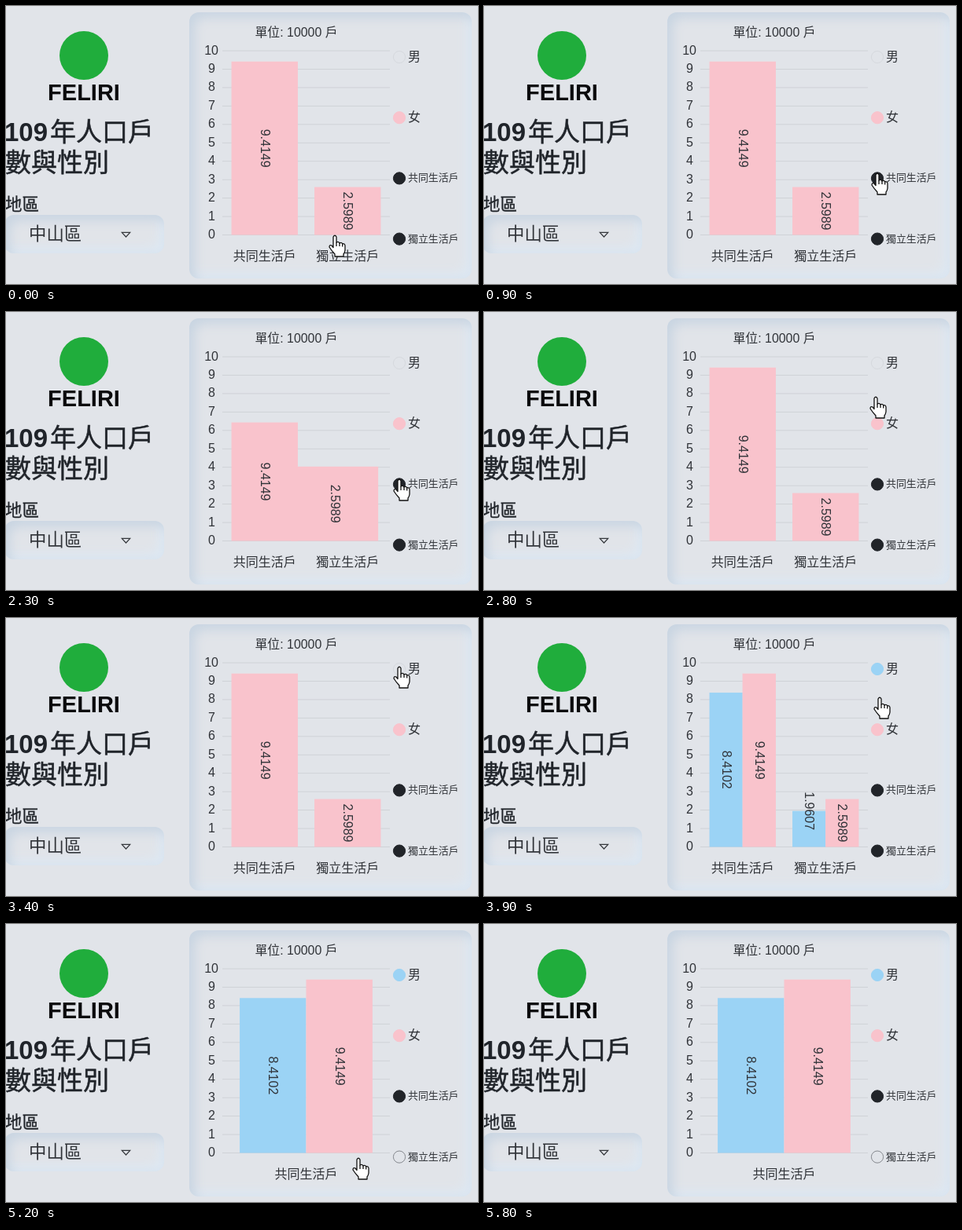
An HTML page that plays this animation: 600 px wide and 354 px high, repeating every 6300 ms.

```html
<!DOCTYPE html>
<html lang="zh-Hant">
<head>
<meta charset="utf-8">
<title>人口戶數與性別</title>
<style>
  html, body { margin: 0; width: 100%; height: 100%; overflow: hidden; }
  body { background: #e1e4e9; }
  #stage { position: relative; width: 600px; height: 354px; overflow: hidden; background: #e1e4e9; }
  .well {
    position: absolute; border-radius: 12px;
    box-shadow: inset 7px 7px 14px #c9d5e2, inset -7px -7px 14px #dde8f3;
  }
  #panel { left: 233px; top: 8px; width: 359px; height: 339px; }
  #select { left: -2px; top: 266px; width: 203px; height: 49px; }
  svg { position: absolute; left: 0; top: 0; }
  text {
    font-family: 'Liberation Sans', 'Noto Sans CJK TC', 'Noto Sans CJK', 'Noto Sans CJK JP', sans-serif;
    font-size: 16px; fill: #303338;
  }
  .head { font-size: 33px; font-weight: 500; fill: #20242a; }
  .cjk { stroke: #20242a; stroke-width: 0.5; }
  .mid { text-anchor: middle; }
  .end { text-anchor: end; }
  .small { font-size: 12.9px; }
</style>
</head>
<body>
<div id="stage">
  <div class="well" id="panel"></div>
  <div class="well" id="select"></div>
  <svg width="600" height="354" viewBox="0 0 600 354">
    <circle cx="99" cy="63" r="31" fill="#20ad3c"/>
    <text class="mid" x="99" y="120" style="font-size:29px;font-weight:bold;fill:#0b0b0d">FELIRI</text>
    <text class="head" x="-2" y="172"><tspan font-weight="bold">109</tspan><tspan class="cjk" dx="3">年人口戶</tspan></text>
    <text class="head cjk" x="-1" y="211">數與性別</text>
    <text class="cjk" x="-1" y="260" style="font-size:21.5px;fill:#20242a;stroke-width:.3">地區</text>
    <text x="29" y="298" style="font-size:22.4px">中山區</text>
    <path d="M147.3 288.3H157.7L152.5 294Z" fill="none" stroke="#33363b" stroke-width="1.2"/>
    <text class="mid" x="369" y="38.5" style="font-size:15.9px">單位: 10000 戶</text>
    <g id="chart"></g>
    <g id="hand" stroke="#111" stroke-width="1.3" stroke-linejoin="round">
      <path fill="#fff" d="M-2 2Q0 -1.5 2 2V9Q4.5 7.5 6 9.8Q8.5 8.5 9.7 10.8Q12.5 10 13 13V19Q12.6 22 11 24V27H0V24Q-4.5 19 -7 15Q-6.8 11.5 -4 13L-2 15.5Z"/>
      <path fill="none" d="M2 9V14M6 10V14M9.7 11V14.5"/>
    </g>
  </svg>
</div>
<script>
const LOOP = 6300, STEP = 100, GROW = 400;
const LEFT = 276, WIDTH = 211, BASE = 291.5;
const series = [
  { name: '男', color: '#9bd3f5', off: '#d6d9de', values: [8.4102, 1.9607] },
  { name: '女', color: '#f9c3cc', off: '#d6d9de', values: [9.4149, 2.5989] }
];
const groups = ['共同生活戶', '獨立生活戶'];

// start time, visible series, visible groups
const states = [
  { at: -GROW, s: [1], g: [0, 1] },
  { at: 1000, s: [1], g: [1] },
  { at: 2200, s: [1], g: [0, 1] },
  { at: 3600, s: [0, 1], g: [0, 1] },
  { at: 4100, s: [0, 1], g: [0] }
];

// time, fingertip x, y
const path = [
  [0, 418, 292], [700, 500, 213], [1000, 500, 213], [1600, 434, 242],
  [2100, 500, 213], [2300, 500, 213], [2800, 498, 108], [3300, 500, 62],
  [3600, 500, 62], [3900, 503, 101], [4100, 502, 300], [4700, 502, 300],
  [5200, 448, 298], [5600, 440, 362], [LOOP, 440, 362]
];

const chart = document.getElementById('chart');
const hand = document.getElementById('hand');
const mix = (a, b, p) => a + (b - a) * p;
const last = (list, test) => list.reduce((found, item, i) => test(item) ? i : found, 0);
const text = (cls, x, y, str, extra = '') => `<text class="${cls}" x="${x}" y="${y}" ${extra}>${str}</text>`;

const scale = st => st.g.includes(0) ? { max: 10, unit: 23.45 } : { max: 3, unit: 64.5 };

function layout(st) {
  const bars = {}, slot = WIDTH / st.g.length, w = slot * 0.8 / st.s.length;
  st.g.forEach((g, i) => st.s.forEach((s, j) => {
    bars[s + '-' + g] = {
      x: LEFT + slot * (i + 0.1) + w * j, w,
      h: series[s].values[g] * scale(st).unit,
      color: series[s].color, label: series[s].values[g]
    };
  }));
  return bars;
}

function drawBar(bar, from, p) {
  const x = mix(from.x, bar.x, p), w = mix(from.w, bar.w, p), h = mix(from.h, bar.h, p);
  const cx = x + w / 2, cy = bar.h < 49 ? BASE - h : BASE - h / 2;
  return [
    `<rect x="${x}" y="${BASE - h}" width="${w}" height="${h}" fill="${bar.color}"/>`,
    text('mid', 0, 5, bar.label, `transform="translate(${cx} ${cy}) rotate(90)"`)
  ];
}

function legend(st) {
  const rows = [
    ...series.map((s, i) => ({ ...s, on: st.s.includes(i), cls: '', dy: 4.5 })),
    ...groups.map((name, i) => ({ name, color: '#212429', off: '#85888e', on: st.g.includes(i), cls: 'small', dy: 4 }))
  ];
  return rows.map((r, i) => {
    const y = 65 + 77.2 * i;
    return `<circle cx="500" cy="${y}" r="7.6" fill="${r.on ? r.color : 'none'}" stroke="${r.on ? r.color : r.off}"/>`
      + text(r.cls, 511, y + r.dy, r.name);
  }).join('');
}

function drawChart(t) {
  const k = last(states, s => s.at <= t), st = states[k];
  const p = 1 - (1 - Math.min(1, (t - st.at) / GROW)) ** 4;
  const bars = layout(st), prev = k ? layout(states[k - 1]) : bars;
  const { max, unit } = scale(st);
  let out = '';
  for (let v = 0; v <= max; v++) {
    const y = BASE - v * unit;
    out += `<path d="M275 ${y}H488" stroke="#cfd2d7"/>` + text('end', 266 + (v > 9 ? 4 : 0), y + 4.5, v);
  }
  const drawn = Object.keys(bars).map(id => drawBar(bars[id], prev[id] || { ...bars[id], h: 0 }, p));
  out += drawn.map(d => d[0]).join('') + drawn.map(d => d[1]).join('');
  const slot = WIDTH / st.g.length;
  st.g.forEach((g, i) => out += text('mid', LEFT + slot * (i + 0.5), 324, groups[g]));
  chart.innerHTML = out + legend(st);
}

function moveHand(t) {
  const i = Math.min(last(path, q => q[0] <= t), path.length - 2);
  const [t0, x0, y0] = path[i], [t1, x1, y1] = path[i + 1];
  const u = (t - t0) / (t1 - t0), p = u * u * (3 - 2 * u);
  hand.setAttribute('transform', `translate(${mix(x0, x1, p)} ${mix(y0, y1, p)})`);
}

let shown = -1;
function frame() {
  const t = Math.floor(performance.now() % LOOP / STEP) * STEP;
  if (t !== shown) {
    shown = t;
    drawChart(t);
    moveHand(t);
  }
  requestAnimationFrame(frame);
}
frame();
</script>
</body>
</html>
```
